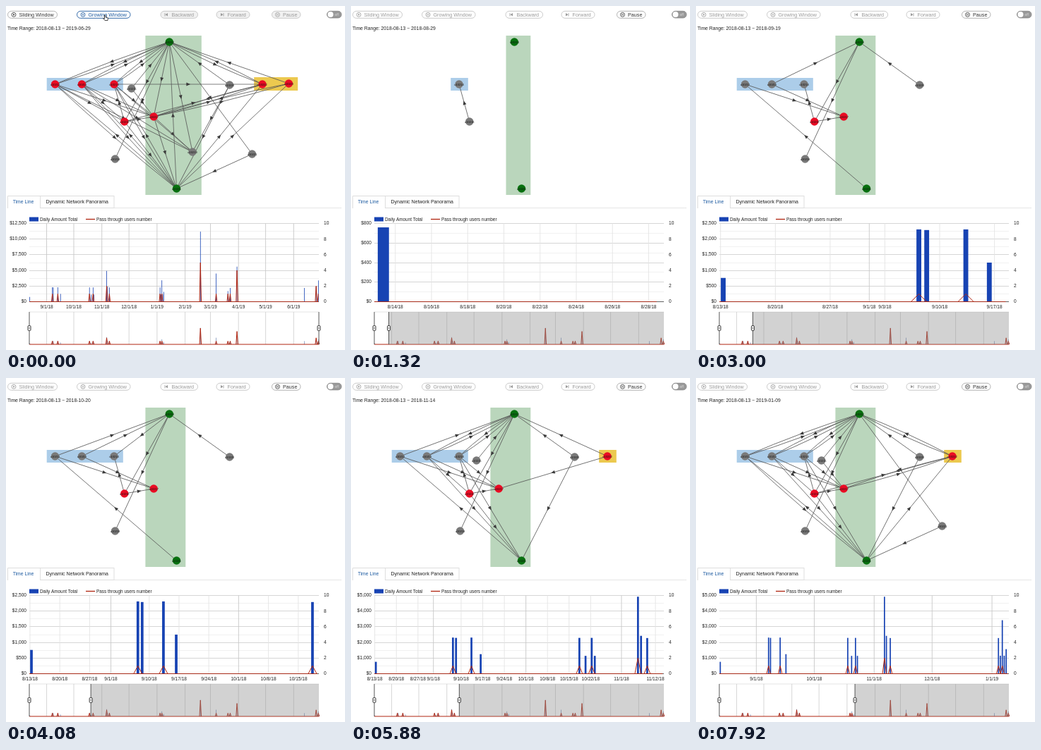
Write an HTML page with a canvas that moves like this. It is 480x488 px and loops after 8000 ms.

```html
<!DOCTYPE html>
<html lang="en">
<head>
<meta charset="utf-8">
<title>Growing window network</title>
<style>
html, body { margin: 0; width: 100%; height: 100%; overflow: hidden; background: #fff; }
canvas { display: block; width: 480px; height: 488px; }
</style>
</head>
<body>
<canvas id="stage" width="480" height="488"></canvas>
<script>
const ctx = document.getElementById('stage').getContext('2d');
const LOOP = 8000, STEP = 120, ALL_DAYS = 320;
const LEFT = 33, RIGHT = 443, TOP = 308.5, BASE = 419.5;
const BLUE = '#1743b3', RED = '#b02510';

// [time in ms, days in the window]
const growth = [[360, 6], [720, 6], [1920, 26], [3000, 37], [4080, 68], [5880, 93.9], [7920, 149.9], [8000, 151]];

// [day, amount, users passing through]
const daily = [
  [0, 760, 0], [25, 2310, 1], [26, 2290, 0], [31, 2310, 1], [34, 1250, 0],
  [66, 2290, 1], [68, 1140, 0], [70, 2290, 1], [71, 1140, 0],
  [85, 4920, 2], [86, 2420, 0], [88, 2280, 1],
  [144, 2280, 1], [145, 1150, 0], [146, 3420, 1], [147, 1150, 0], [148, 1570, 0],
  [188.6, 11200, 5], [206, 4500, 1], [219, 1700, 1], [221.5, 2200, 1],
  [229, 5600, 4], [303.4, 2200, 0], [316.5, 2400, 2], [319, 3400, 1]
];

// name: [x, y, day it turns red]
const nodes = {
  A: [231.3, 51], B: [241.5, 259], L1: [69.5, 111, 188], L2: [107.4, 111, 188], L3: [153, 111, 188],
  G1: [177.7, 117], R1: [167.7, 164, 31], C: [209.2, 157, 25], G2: [154.5, 217], G3: [264, 207],
  G4: [316.6, 112], G5: [348.5, 210], Y1: [363, 111, 84], Y2: [400.4, 110, 206]
};
const groups = [['#accde9', 'L1 L2 L3'], ['#bad6bc', 'A B C G3'], ['#ecc94f', 'Y1 Y2']];

// day: links first seen that day
const linkDays = {
  0: 'R1>L3',
  25: 'L1>C L2>C',
  26: 'R1>C L2>A',
  31: 'A>R1 B>L1 G4>A',
  34: 'A>G2',
  66: 'L1>A A>L3',
  70: 'L2>B G1>A',
  85: 'Y1>A Y1>C L3>B A>L2',
  86: 'L3>C L2>R1 G4>B L3>A',
  88: 'R1>B',
  144: 'G5>B A>G5 G1>C A>L1',
  146: 'B>Y1 R1>Y1 L1>B A>Y1 C>Y1',
  188.6: 'B>A A>C C>B A>G3 L1>G3 L3>G3 L2>G3 B>L2 L1>R1',
  206: 'Y2>A C>Y2 L3>Y1 G4>G3 B>L3',
  229: 'B>Y2 C>G3 Y2>C'
};
const links = Object.entries(linkDays).flatMap(([day, list]) =>
  list.split(' ').map(pair => [...pair.split('>'), +day]));
const born = { A: -1, B: -1 };
for (const [from, to, day] of links)
  for (const name of [from, to]) born[name] = Math.min(born[name] ?? 999, day);

function text(string, x, y, size, color = '#222', align = 'left') {
  ctx.font = `${size}px "Liberation Sans", Arial, sans-serif`;
  ctx.textAlign = align;
  ctx.textBaseline = 'middle';
  ctx.fillStyle = color;
  ctx.fillText(string, x, y);
}

function stroke(color, width) {
  ctx.strokeStyle = color;
  ctx.lineWidth = width;
  ctx.stroke();
}

function line(points, color, width = 1) {
  ctx.beginPath();
  points.forEach(([x, y]) => ctx.lineTo(x, y));
  stroke(color, width);
}

function shape(points, color) {
  ctx.beginPath();
  points.forEach(([x, y]) => ctx.lineTo(x, y));
  ctx.fillStyle = color;
  ctx.fill();
}

function rect(x, y, w, h, color) {
  ctx.fillStyle = color;
  ctx.fillRect(x, y, w, h);
}

function disc(x, y, r, color) {
  ctx.beginPath();
  ctx.arc(x, y, r, 0, 7);
  ctx.fillStyle = color;
  ctx.fill();
}

function pill(x, y, w, h, r, fill, border) {
  ctx.beginPath();
  ctx.roundRect(x, y, w, h, r);
  ctx.fillStyle = fill;
  ctx.fill();
  stroke(border, 0.9);
}

const dateOf = day => new Date(Date.UTC(2018, 7, 13 + Math.floor(day)));
const isoDate = day => dateOf(day).toISOString().slice(0, 10);
function shortDate(day) {
  const d = dateOf(day);
  return `${d.getUTCMonth() + 1}/${d.getUTCDate()}/${d.getUTCFullYear() % 100}`;
}

function daysAt(time) {
  if (time < growth[0][0]) return ALL_DAYS;
  const i = growth.findIndex(([t]) => t > time);
  const [t0, d0] = growth[i - 1], [t1, d1] = growth[i];
  return d0 + (d1 - d0) * (time - t0) / (t1 - t0);
}

function button(label, icon, x, w, textX, color, border, fill = '#fff') {
  pill(x, 7.3, w, 10, 5, fill, border);
  const ix = textX - 7.5, y = 12.3;
  if (icon === 'back' || icon === 'next') {
    const s = icon === 'back' ? 1 : -1;
    shape([[ix - 1.5 * s, y], [ix + 2 * s, y - 2.2], [ix + 2 * s, y + 2.2]], color);
    line([[ix - 2 * s, y - 2.2], [ix - 2 * s, y + 2.2]], color, 0.8);
  } else {
    ctx.beginPath();
    ctx.arc(ix, y, 3, 0, 7);
    stroke(color, 0.8);
    if (icon === 'play') shape([[ix - 0.9, y - 1.5], [ix + 1.6, y], [ix - 0.9, y + 1.5]], color);
    else for (const dx of [-0.8, 0.8]) line([[ix + dx, y - 1.3], [ix + dx, y + 1.3]], color, 0.7);
  }
  text(label, textX, 12.6, 7.2, color);
}

function drawControls(idle, days) {
  const off = '#9a9a9a', edge = '#c4c4c4', on = '#333', blue = '#1c5aa0';
  const fill = idle ? '#f1f1f1' : '#fff';
  button('Sliding Window', 'play', 2.5, 70, 18.5, idle ? on : off, idle ? '#aaa' : edge);
  button('Growing Window', 'pause', 100.5, 75.5, 116.5, idle ? blue : off, idle ? blue : edge);
  button('Backward', 'back', 219, 52.5, 234.5, off, edge, fill);
  button('Forward', 'next', 298, 47, 313.5, off, edge, fill);
  button('Pause', 'pause', 376.5, 40.5, 392, idle ? off : on, idle ? edge : '#aaa', fill);
  pill(454.5, 7.3, 20.5, 9.6, 4.8, '#999', '#888');
  disc(459.5, 12.1, 4, '#fff');
  text('off', 465.5, 12.3, 5, '#ddd');
  text(`Time Range: 2018-08-13 ~ ${isoDate(days)}`, 2, 32, 6.8);
  if (idle) {
    const hand = [[139.5, 13], [141, 13], [141, 16], [144.5, 17], [144, 20.5], [140, 20.5], [137.5, 17.5], [139.5, 18], [139.5, 13]];
    shape(hand, '#fff');
    line(hand, '#222', 0.8);
  }
}

// Opposite links between the same two nodes bow apart.
function drawLink(from, to, bow) {
  const [x0, y0] = nodes[from], [x1, y1] = nodes[to];
  const length = Math.hypot(x1 - x0, y1 - y0);
  ctx.save();
  ctx.translate(x0, y0);
  ctx.rotate(Math.atan2(y1 - y0, x1 - x0));
  ctx.beginPath();
  ctx.moveTo(0, 0);
  ctx.quadraticCurveTo(length / 2, bow * 2, length, 0);
  stroke('#555', 0.75);
  ctx.translate(length / 2, bow);
  shape([[3, 0], [-2.6, -2.4], [-2.6, 2.4]], '#3a3a3a');
  ctx.restore();
}

function drawNetwork(seen) {
  for (const [color, list] of groups) {
    const members = list.split(' ').filter(name => seen(born[name])).map(name => nodes[name]);
    if (!members.length) continue;
    const xs = members.map(n => n[0]), ys = members.map(n => n[1]);
    const x = Math.min(...xs) - 11.8, y = Math.min(...ys) - 9;
    rect(x, y, Math.max(...xs) + 12.8 - x, Math.max(...ys) + 9 - y, color);
  }
  const shown = links.filter(link => seen(link[2]));
  for (const [from, to] of shown) {
    const paired = shown.some(([a, b]) => a === to && b === from);
    drawLink(from, to, paired ? 2.3 : 0);
  }
  Object.entries(nodes).forEach(([name, [x, y, redDay]], i) => {
    if (!seen(born[name])) return;
    const color = name < 'C' ? '#08700f' : redDay && seen(redDay) ? '#ea0c24' : '#797979';
    disc(x, y, 5.7, color);
    text(`u102${i + 10}`, x, y + 0.4, 4, '#111', 'center');
  });
}

function drawTabs() {
  line([[153, 286.5], [475, 286.5]], '#e6e6e6');
  ctx.strokeStyle = '#ddd';
  ctx.lineWidth = 1;
  ctx.strokeRect(48.5, 269.5, 104.5, 17);
  line([[2.5, 287], [2.5, 269.5], [48.5, 269.5]], '#ddd');
  text('Time Line', 9.7, 277.7, 6.8, '#1c5aa0');
  text('Dynamic Network Panorama', 56.6, 277.7, 6.95);
}

const tickX = (day, scale) => LEFT + (day + 0.16) * scale;

function dateTicks(days, scale) {
  const every = scale >= 55 ? 0.5 : scale >= 30 ? 1 : scale >= 13.5 ? 2 : 7;
  const months = [], regular = [];
  for (let d = 0; d < days; d++) if (dateOf(d).getUTCDate() === 1) months.push(d);
  if (every < 7) {
    for (let d = every === 2 ? 1 : 0; d < days; d += every) regular.push(d);
    return regular;
  }
  if (scale < 3.6) return months;
  const width = day => shortDate(day).replace(/\//g, '').length * 3.67 + 3.7;
  for (let d = 0; d < days; d += 7) {
    const clear = months.every(m => Math.abs(m - d) * scale > (width(m) + width(d)) / 2);
    if (clear) regular.push(d);
  }
  return [...months, ...regular];
}

function drawPeaks(xOf, base, unit, rows) {
  for (const [day, , users] of rows)
    if (users) line([[xOf(day - 1), base], [xOf(day), base - users * unit], [xOf(day + 1), base]], RED, 1);
}

function drawChart(days, rows) {
  const scale = (RIGHT - LEFT) / days, height = BASE - TOP;
  const peak = Math.max(...rows.map(r => r[1]));
  const step = [200, 500, 1000, 2500].find(s => peak / s <= 5);
  const parts = Math.ceil(peak / step);

  rect(33, 299.5, 13, 6, BLUE);
  text('Daily Amount Total', 48, 302.8, 6.4);
  line([[113, 302.5], [126, 302.5]], RED, 1.3);
  text('Pass through users number', 128, 302.8, 6.4);

  for (let i = 0; i <= parts * 2; i++) {
    const y = Math.floor(BASE - height * i / parts / 2) + 0.5;
    line([[LEFT, y], [RIGHT, y]], i % 2 ? '#f0f0f0' : '#d2d2d2', 0.9);
    if (i % 2 === 0) text('$' + (step * i / 2).toLocaleString('en-US'), 29, y, 6.6, '#222', 'right');
  }
  for (let i = 0; i <= 5; i++) text(String(i * 2), 450, BASE - height * i / 5, 6.6);

  for (const day of dateTicks(days, scale)) {
    const x = tickX(day, scale);
    const month = dateOf(day).getUTCDate() === 1;
    line([[x, TOP], [x, BASE]], month ? '#c8c8c8' : '#e4e4e4', 0.9);
    text(shortDate(day), x, 427.4, 6.6, '#222', 'center');
  }

  const xOf = day => LEFT + (day + 0.5) * scale;
  for (const [day, amount] of rows) {
    const w = Math.max(0.8, scale * 0.62), h = height * amount / (step * parts);
    rect(xOf(day) - w / 2, BASE - h, w, h, BLUE);
  }
  line([[LEFT, BASE], [RIGHT, BASE]], '#444', 0.8);
  ctx.save();
  ctx.beginPath();
  ctx.rect(LEFT, TOP, (days - 0.4) * scale, height + 1);
  ctx.clip();
  line([[LEFT, BASE], [RIGHT, BASE]], RED, 0.9);
  drawPeaks(xOf, BASE, height / 10, rows);
  ctx.restore();
}

function drawOverview(days) {
  const top = 434, base = 480, scale = (RIGHT - LEFT) / ALL_DAYS;
  const end = LEFT + days * scale;
  const xOf = day => LEFT + (day + 0.5) * scale;
  line([[LEFT, top], [RIGHT, top]], '#ddd', 0.8);
  for (const day of dateTicks(ALL_DAYS, scale)) {
    const x = tickX(day, scale);
    line([[x, top], [x, base]], '#ccc', 0.8);
  }
  for (const [day, amount] of daily) {
    const h = (base - top) * amount / 22000;
    rect(xOf(day) - 0.4, base - h, 0.8, h, '#7b91b8');
  }
  line([[LEFT, base], [RIGHT, base]], RED, 1);
  drawPeaks(xOf, base, (base - top) / 10, daily);
  rect(end, top, RIGHT - end, base - top, 'rgba(140, 140, 140, 0.39)');
  for (const x of [LEFT, end]) {
    line([[x, top], [x, base]], '#444', 0.9);
    pill(x - 2, 453.5, 4, 7, 1.3, '#fff', '#222');
    line([[x, 455.5], [x, 458.5]], '#444', 0.7);
  }
}

function draw(now) {
  const time = Math.floor((now % LOOP) / STEP) * STEP;
  const days = daysAt(time);
  const seen = day => day < days - 0.6;
  rect(0, 0, 480, 488, '#fff');
  drawControls(days === ALL_DAYS, days);
  drawNetwork(seen);
  drawTabs();
  drawChart(days, daily.filter(([day]) => seen(day)));
  drawOverview(days);
}

const start = performance.now();
function tick() {
  draw(performance.now() - start);
  requestAnimationFrame(tick);
}
tick();
</script>
</body>
</html>
```
